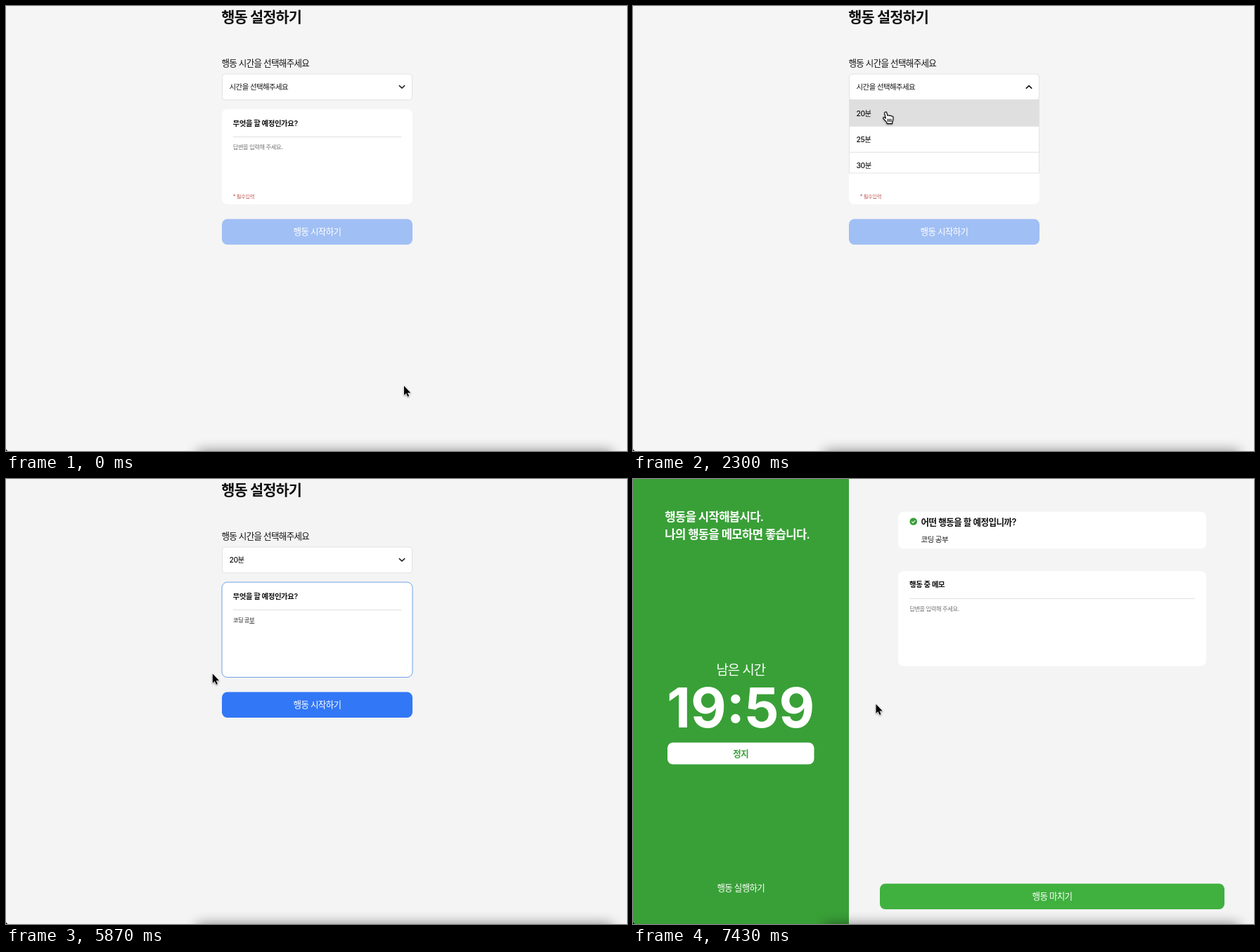
Write an HTML page that moves like this. It is 883 px wide and 634 px high and loops after 7.46 s.

```html
<!DOCTYPE html>
<html lang="ko">
<head>
<meta charset="utf-8">
<style>
html, body { margin: 0; width: 100%; height: 100%; overflow: hidden; background: #f5f5f5; }
svg { display: block; width: 883px; height: 634px; }
text { font-family: Inter, "Noto Sans CJK KR", "Noto Sans CJK JP", sans-serif; letter-spacing: -.053em; white-space: pre; }
[font-weight="600"], [font-weight="700"] { letter-spacing: -.041em; }
text.clock { letter-spacing: 0; font-variant-ligatures: no-contextual; }
.composing { text-decoration: underline; }
#pointer { filter: drop-shadow(0 1px 1px #0006); }
</style>
</head>
<body>
<svg id="stage" viewBox="0 0 883 634"></svg>
<script>
const LOOP = 7460;
const OPEN = 1300, PICK = 2380, FOCUS = 2830, LEAVE = 6470, RUN = 7400;
const SIZE = { s: 7.3, m: 8.34, l: 10.43, xl: 12.52 };

// y is the visual middle of the line; left-aligned x is where the ink begins
function label(str, x, y, size, { weight = 500, fill = '#111', mid = false, id = '' } = {}) {
  const left = mid ? x : x - size * .04;
  return `<text id="${id}" x="${left}" y="${y + size * .37}" font-size="${size}" font-weight="${weight}" fill="${fill}"` +
    ` text-anchor="${mid ? 'middle' : 'start'}">${str}</text>`;
}
const box = (x, y, w, h, r, fill, more = '') =>
  `<rect x="${x}" y="${y}" width="${w}" height="${h}" rx="${r}" fill="${fill}" ${more}/>`;
const rule = (x1, x2, y) => `<path d="M${x1} ${y}H${x2}" stroke="#dfdfdf"/>`;
const edge = 'stroke="#e2e2e2"';

const form =
  label('행동 설정하기', 307, 15, 20.85, { weight: 700 }) +
  label('행동 시간을 선택해주세요', 307, 81.5, SIZE.xl) +
  box(307, 147, 271, 135.5, 7.8, '#fff', 'id="card"') +
  label('무엇을 할 예정인가요?', 323, 166.8, SIZE.l, { weight: 600 }) +
  rule(323, 562.5, 186.5) +
  label('', 323, 201, SIZE.m, { id: 'answer' }) +
  '<path id="caret" stroke="#222" stroke-width=".9"/>' +
  label('', 323, 271.5, SIZE.s, { fill: '#bf5a55', id: 'warning' }) +
  box(307, 303.5, 271, 36.5, 7.8, '#a0bff4', 'id="start"') +
  label('행동 시작하기', 442.5, 321.5, SIZE.xl, { fill: '#fff', mid: true }) +
  box(307.5, 97, 270, 36.8, 4, '#fff', edge) +
  label('', 318, 115.2, SIZE.l, { id: 'choice' }) +
  '<path id="chevron" d="M-3.7-1.8L0 1.7L3.7-1.8" fill="none" stroke="#111" stroke-width="1.6" stroke-linecap="round" stroke-linejoin="round"/>' +
  '<g id="list">' +
    box(307.5, 133.5, 270, 104.5, 0, '#fff', edge) +
    box(308, 134, 269.5, 37, 0, '#dfdfdf') +
    rule(308, 577, 171.3) + rule(308, 577, 208.3) +
    ['20분', '25분', '30분'].map((s, i) => label(s, 318, 153 + 37 * i, SIZE.l)).join('') +
  '</g>';

const white = { fill: '#fff', mid: true };
const run =
  box(0, 0, 307, 634, 0, '#39a037') +
  label('행동을 시작해봅시다.', 46, 53.5, 16.7, { weight: 600, fill: '#fff' }) +
  label('나의 행동을 메모하면 좋습니다.', 46, 78.5, 16.7, { weight: 600, fill: '#fff' }) +
  label('남은 시간', 153.3, 272, 18.8, { ...white, weight: 400 }) +
  '<text class="clock" x="153.3" y="353.5" font-size="78.2" font-weight="700" fill="#fff" text-anchor="middle">' +
    '19<tspan dy="-6.5">:</tspan><tspan dy="6.5">59</tspan></text>' +
  box(49, 375.5, 208.5, 31, 7.8, '#fff') +
  label('정지', 153.3, 391, SIZE.xl, { weight: 600, fill: '#39a037', mid: true }) +
  label('행동 실행하기', 153.3, 582.8, SIZE.xl, white) +
  box(377, 46.5, 438, 53, 7.8, '#fff') +
  '<circle cx="398.7" cy="60.5" r="5.3" fill="#39a037"/>' +
  '<path d="M396.3 60.6l1.8 1.8l3.1-3.4" fill="none" stroke="#fff" stroke-width="1.1"/>' +
  label('어떤 행동을 할 예정입니까?', 410, 61.2, SIZE.xl, { weight: 600 }) +
  label('코딩 공부', 410, 86, SIZE.l) +
  box(377, 131, 438, 135.5, 7.8, '#fff') +
  label('행동 중 메모', 393.5, 150.6, SIZE.l, { weight: 600 }) +
  rule(393.5, 799, 170.3) +
  label('답변을 입력해 주세요.', 393.5, 184.8, SIZE.m, { fill: '#767676' }) +
  box(351, 576.5, 490, 36.5, 7.8, '#40b13f') +
  label('행동 마치기', 596, 594.5, SIZE.xl, white);

const pointers =
  '<path id="arrow" d="M0 .3V13.5L3 10.7L5.1 15.6L7.1 14.7L5 10H9.3Z" fill="#000" stroke="#fff" stroke-width="1.1" paint-order="stroke"/>' +
  '<g id="hand" stroke="#000" stroke-width="1.1" stroke-linecap="round" stroke-linejoin="round">' +
    '<path fill="#fff" d="M-1.4 1.6C-1.4-.4 1.2-.6 1.7 1L3 5.3C4 4.4 5.4 4.7 5.8 5.6C6.9 4.8 8.3 5.2 8.6 6.2C9.7 5.6 11 6.2 11 7.6' +
    'C11.2 10.2 10.6 12.4 9.6 14.2V16.6H2V15C.4 13.2-1 11.6-3 9.4C-4 8-2.4 6.9-1 8L.4 9.2Z"/>' +
    '<path d="M3.5 10V13.6M5.7 10V13.6M7.9 10V13.6"/></g>' +
  '<path id="beam" d="M-2.5-7Q0-7 0-5.5Q0-7 2.5-7M0-5.5V5.5M-2.5 7Q0 7 0 5.5Q0 7 2.5 7" fill="none" stroke="#222"/>';

const stage = document.getElementById('stage');
stage.innerHTML =
  '<defs><filter id="blur" x="-10%" y="-100%" width="120%" height="300%"><feGaussianBlur stdDeviation="9"/></filter></defs>' +
  box(0, 0, 883, 634, 0, '#f5f5f5', 'id="back"') +
  `<g id="form">${form}</g><g id="run">${run}</g>` +
  box(272, 634, 590, 40, 0, '#000', 'opacity=".46" filter="url(#blur)"') +
  '<path d="M0 630.5Q.4 634 4 634H0Z"/>' +
  `<g id="pointer">${pointers}</g>`;

const ui = {};
for (const el of stage.querySelectorAll('[id]')) if (el.id) ui[el.id] = el;

// [time, committed text, syllable being composed]
const typing = [
  [3470, '', 'ㅋ'], [3700, '', '코'], [3900, '', '콛'], [4070, '코', '디'], [4270, '코', '딩'],
  [4470, '코딩 ', ''], [4700, '코딩 ', 'ㄱ'], [4800, '코딩 ', '고'], [4900, '코딩 ', '공'],
  [5010, '코딩 공', 'ㅂ'], [5150, '코딩 공', '부']
];

// [time, x, y] of the pointer's hot spot
const path = [
  [0, 566, 541], [30, 566, 541], [770, 377, 126], [970, 377, 126], [1080, 375.5, 123.5], [1320, 375.5, 123.5],
  [1700, 361, 150], [1830, 359, 151], [2400, 359, 151], [2740, 345, 206], [5560, 345, 206],
  [5870, 294, 277], [6000, 254, 303], [6200, 344, 333], [6330, 345, 333], [6460, 345.5, 320.5], [LOOP, 345.5, 320.5]
];

function slope(i, k) {
  const a = path[i - 1], b = path[i], c = path[i + 1];
  if (!a || !c) return 0;
  const before = b[k] - a[k], after = c[k] - b[k];
  return before * after <= 0 ? 0 : (before + after) / (c[0] - a[0]);
}

function pointerAt(t) {
  let i = 0;
  while (i < path.length - 2 && t >= path[i + 1][0]) i++;
  const a = path[i], b = path[i + 1], d = b[0] - a[0], u = (t - a[0]) / d, v = 1 - u;
  return [1, 2].map(k =>
    v * v * (1 + 2 * u) * a[k] + u * u * (3 - 2 * u) * b[k] +
    d * u * v * (v * slope(i, k) - u * slope(i + 1, k)));
}

const show = (el, on) => el.setAttribute('display', on ? 'inline' : 'none');

function draw(t) {
  const open = t >= OPEN && t < PICK;
  const focus = t >= FOCUS;
  const onForm = t < LEAVE;
  const [, done, part] = typing.findLast(k => t >= k[0]) || [0, '', ''];
  const length = (done + part).length;
  const ready = length >= 5;

  ui.back.setAttribute('fill', t < 5570 ? '#f5f5f5' : '#f4f4f4');
  show(ui.form, onForm);
  show(ui.run, t >= RUN);
  show(ui.list, open);
  ui.choice.textContent = t < PICK ? '시간을 선택해주세요' : '20분';
  ui.chevron.setAttribute('transform', `translate(563 115.3) scale(1 ${open ? -1 : 1})`);
  ui.card.setAttribute('stroke', focus ? '#6f9fe6' : 'none');
  ui.start.setAttribute('fill', ready ? '#3277f5' : '#a0bff4');
  ui.answer.setAttribute('fill', length ? '#222' : '#767676');
  ui.answer.innerHTML = length ? `${done}<tspan class="composing">${part}</tspan>` : '답변을 입력해 주세요.';
  ui.warning.textContent = ready ? '' : length ? '최소 5자 이상 입력해주세요.' : '* 필수입력';
  show(ui.caret, focus && !part && (length || (t - FOCUS) % 1000 < 500));
  ui.caret.setAttribute('d', `M${length ? 339.7 : 323} 196V206.3`);

  const [x, y] = pointerAt(t);
  const inside = (top, bottom) => onForm && x > 307 && x < 578 && y > top && y < bottom;
  const hand = inside(97, open ? 238 : 134) || (ready && inside(304, 340));
  const beam = !hand && inside(190, 265);
  show(ui.pointer, t < 3470 || t >= 5570);
  show(ui.hand, hand);
  show(ui.beam, beam);
  show(ui.arrow, !hand && !beam);
  ui.pointer.setAttribute('transform', `translate(${x} ${y})`);
}

const began = performance.now();
function tick() {
  draw((performance.now() - began) % LOOP);
  requestAnimationFrame(tick);
}
tick();
</script>
</body>
</html>
```
